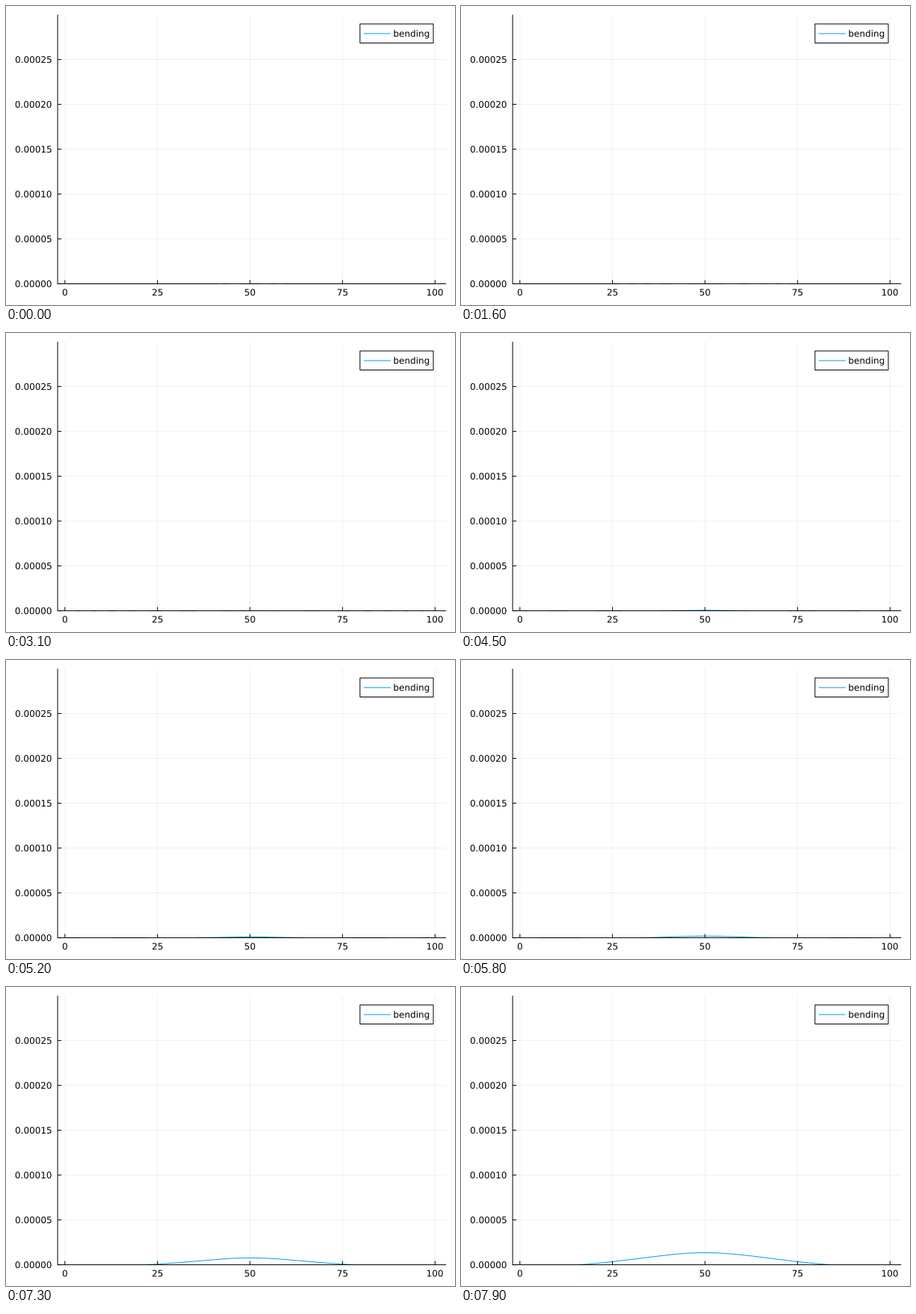
Recreate the animation shown at these times as a matplotlib script. Size 600 by 400 pixels, loop 8 s.

```python
import numpy as np
import matplotlib.pyplot as plt
from matplotlib.animation import FuncAnimation
from matplotlib.patches import PathPatch, Rectangle
from matplotlib.textpath import TextPath
from matplotlib.transforms import Affine2D

W, H, DPI = 600, 400, 100
PT = 72 / DPI                       # points per pixel
BLUE = "#009afa"
LEFT, RIGHT, TOP, BASE = 69, 588.2, 11.6, 371.59
FRAMES, STEP = 80, 100

plt.rcParams.update({"font.family": "DejaVu Sans",
                     "lines.solid_capstyle": "butt"})

fig = plt.figure(figsize=(W / DPI, H / DPI), dpi=DPI, facecolor="white")
ax = fig.add_axes([0, 0, 1, 1])
ax.set_xlim(0, W)
ax.set_ylim(H, 0)
ax.axis("off")


def px(x):
    return 78.75 + 4.9457 * x


def stroke(xs, ys, color="black", **kw):
    return ax.plot(xs, ys, color=color, lw=PT, snap=False, **kw)[0]


def label(x, y, text, align=0.5):
    """Outline text; align 0, 0.5, 1 puts x at its left, middle or right."""
    path = TextPath((0, 0), text, size=12)
    box = path.get_extents()
    place = Affine2D().translate(-box.x0 - align * box.width, 0)
    place.scale(1, -1).translate(x, y)
    ax.add_patch(PathPatch(place.transform_path(path), fc="black", lw=0,
                           snap=False, zorder=5))


for v in range(0, 101, 25):
    x = px(v)
    stroke([x, x], [TOP, BASE], alpha=0.06, zorder=0)
    stroke([x, x], [BASE, BASE - 5], zorder=3)
    label(x, 387.4, str(v))

for i in range(6):
    y = BASE - 60 * i
    stroke([LEFT, RIGHT], [y, y], alpha=0.06, zorder=0)
    stroke([LEFT, LEFT + 5], [y, y], zorder=3)
    label(60.6, y + 4.4, f"{i * 5e-5:.5f}", 1)

stroke([LEFT, LEFT], [TOP, BASE + 0.5], zorder=3)
stroke([LEFT, RIGHT], [BASE, BASE], zorder=3)

# Legend
ax.add_patch(Rectangle((473, 24), 98, 25.5, fc="white", ec="black",
                       lw=PT, snap=False, zorder=4))
stroke([478, 514], [36.9, 36.9], BLUE, zorder=5)
label(518.6, 41.1, "bending", 0)

# Elastic beam under a sudden point load: dispersive waves, log-spaced time
T_END, RATE, PEAK = 312.0, 0.063, 16.2
k = np.arange(1, 7500) * 4e-4
dist = np.arange(51)
kernel = np.cos(np.outer(dist, k)) * np.exp(-(k / 2.2) ** 8) / k ** 4 * 4e-4
scale = PEAK / (kernel[0] @ (1 - np.cos(k ** 2 * T_END)))

nodes = np.arange(1, 101)
fine = np.linspace(1, 100, 1981)
curve = stroke([], [], BLUE, zorder=2)


def update(i):
    t = T_END * np.exp(RATE * (i - FRAMES + 1))
    w = scale * (kernel @ (1 - np.cos(k ** 2 * t)))
    w[dist > 3.9 * t] = 0           # ahead of the wave front
    y = np.interp(fine, nodes, w[np.abs(nodes - 50)])
    y[y < 0] = np.nan               # below the axis
    curve.set_data(px(fine), BASE - y)
    return [curve]


anim = FuncAnimation(fig, update, frames=FRAMES, interval=STEP,
                     repeat=True, repeat_delay=0)
plt.show()
```
